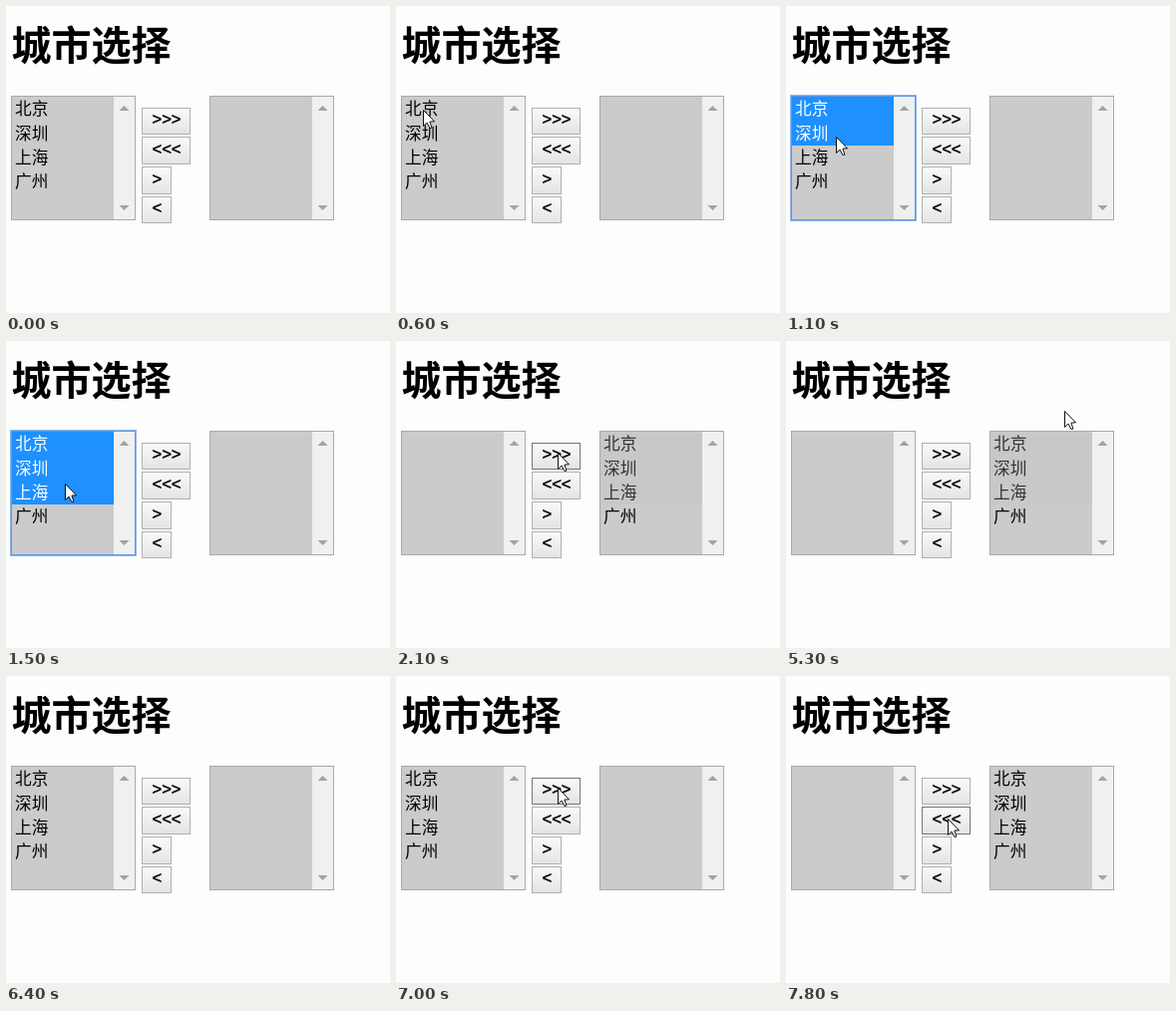
Animation, 385 px wide and 308 px high, one loop 8000 ms. Source, as an HTML page with a canvas:

```html
<!DOCTYPE html>
<html lang="zh-CN">
<head>
<meta charset="utf-8">
<title>城市选择</title>
<style>
html, body { margin: 0; width: 100%; height: 100%; overflow: hidden; background: #fdfdfd; }
canvas { display: block; width: 385px; height: 308px; }
</style>
</head>
<body>
<canvas id="stage" width="385" height="308"></canvas>
<script>
const ctx = document.getElementById('stage').getContext('2d');
const LOOP = 8000, STEP = 100;
const CJK = '"Noto Sans CJK SC", "Noto Sans CJK", "Noto Sans CJK JP", sans-serif';
const CITIES = ['北京', '深圳', '上海', '广州'];
const LABELS = ['>>>', '<<<', '>', '<'];
const LIST = { y: 90, size: 125, row: 24.3 };
const BUTTON = { x: 136, y: 102, pitch: 29.67, height: 27.7 };
const PRESS = 900, DROP = 1500, ADD = 2100, RETURN = 6400, ADD_AGAIN = 7300;

const linear = k => k;
const easeOut = k => 1 - (1 - k) ** 3;
const smooth = k => k * k * (3 - 2 * k);

// Each visit is a chain of glides; the pointer is hidden between visits.
const at = (x, y) => ({ x, y });
const glide = (from, to, target, ease) => ({ from, to, target, ease });
const VISITS = [
  { begin: 100, end: 5500, origin: at(281, 65), glides: [
    glide(100, 600, at(27, 104), easeOut),
    glide(PRESS, DROP, at(59, 143), easeOut),
    glide(DROP, 1900, at(162, 112), smooth),
    glide(2700, 3300, at(163, 151), smooth),
    glide(5100, 5400, at(337, 30), linear)
  ] },
  { begin: 6500, end: LOOP, origin: at(353, 32), glides: [
    glide(6500, 7000, at(162, 112), easeOut),
    glide(ADD_AGAIN, 7800, at(162, 143), smooth)
  ] }
];

function pointerAt(t) {
  const visit = VISITS.find(v => t >= v.begin && t < v.end);
  if (!visit) return null;
  let { x, y } = visit.origin;
  for (const { from, to, target, ease } of visit.glides) {
    const k = ease(Math.min(1, Math.max(0, (t - from) / (to - from))));
    x += (target.x - x) * k;
    y += (target.y - y) * k;
  }
  return at(Math.round(x), Math.round(y));
}

// Dragging selects every row down to the pointer.
function selectedRows(t) {
  if (t < PRESS || t >= RETURN) return 0;
  const { y } = pointerAt(Math.min(t, DROP));
  return Math.ceil((y - LIST.y) / LIST.row);
}

function text(str, x, y, font, color) {
  ctx.font = font;
  ctx.fillStyle = color;
  ctx.fillText(str, x, y);
}

function polygon(points) {
  ctx.beginPath();
  points.forEach(([x, y]) => ctx.lineTo(x, y));
  ctx.closePath();
}

function frame(x, y, w, h, color) {
  ctx.strokeStyle = color;
  ctx.lineWidth = 1;
  ctx.strokeRect(x + 0.5, y + 0.5, w - 1, h - 1);
}

function scrollArrow(x, y, dir) {
  polygon([[x - 5, y + 2.5 * dir], [x + 5, y + 2.5 * dir], [x, y - 2.5 * dir]]);
  ctx.fillStyle = '#a3a3a3';
  ctx.fill();
}

function drawList(x, filled, selected, focused) {
  const { y, size, row } = LIST;
  ctx.fillStyle = '#cbcbcb';
  ctx.fillRect(x, y, size, size);
  if (selected) {
    ctx.fillStyle = focused ? '#1e90ff' : '#c8c8c8';
    ctx.fillRect(x + 1, y + 1, 102, Math.round(selected * row));
  }
  if (filled) CITIES.forEach((city, i) => {
    const color = i >= selected ? '#000' : focused ? '#fff' : '#323232';
    text(city, x + 4, y + 19.3 + i * row, '16.67px ' + CJK, color);
  });
  ctx.fillStyle = '#f1f0f1';
  ctx.fillRect(x + 103, y + 1, 21, size - 2);
  scrollArrow(x + 113.5, y + 12.5, 1);
  scrollArrow(x + 113.5, y + 112.5, -1);
  frame(x, y, size, size, focused ? '#5b98e3' : '#a9a9a9');
  if (focused) frame(x - 1, y - 1, size + 2, size + 2, '#8ab6ec');
}

function drawButton(label, i, pointer) {
  const { x } = BUTTON;
  const top = BUTTON.y + i * BUTTON.pitch;
  const y = Math.floor(top), h = Math.floor(top + BUTTON.height) - y;
  const w = label.length > 1 ? 49 : 30;
  const hover = pointer && pointer.x >= x && pointer.x < x + w && pointer.y >= y && pointer.y < y + h;
  const shade = ctx.createLinearGradient(0, y, 0, y + h);
  shade.addColorStop(0, '#fafafa');
  shade.addColorStop(1, '#e3e3e3');
  ctx.fillStyle = shade;
  ctx.fillRect(x, y, w, h);
  frame(x, y, w, h, hover ? '#747474' : '#b0b0b0');
  const baseline = Math.round(top + 17.2);
  text(label, x + 10.4, baseline, '16.67px "Liberation Sans", sans-serif', '#000');
  ctx.strokeStyle = '#000';
  ctx.lineWidth = 0.4;
  ctx.strokeText(label, x + 10.4, baseline);
}

function drawPointer({ x, y }) {
  ctx.save();
  ctx.translate(x + 0.5, y + 0.5);
  polygon([[0, 0], [0, 16], [3.6, 12.6], [6.4, 18], [8.4, 17.6], [6.4, 11.6], [11, 11.3]]);
  ctx.fillStyle = '#fff';
  ctx.fill();
  ctx.strokeStyle = '#111';
  ctx.lineWidth = 1;
  ctx.stroke();
  ctx.restore();
}

function draw(t) {
  const pointer = pointerAt(t);
  const moved = (t >= ADD && t < RETURN) || t >= ADD_AGAIN;
  const selected = selectedRows(t);
  ctx.fillStyle = '#fdfdfd';
  ctx.fillRect(0, 0, 385, 308);
  text('城市选择', 5.6, 53.5, 'bold 40px ' + CJK, '#000');
  drawList(5, !moved, moved ? 0 : selected, !moved && selected > 0);
  drawList(204, moved, moved ? selected : 0, false);
  LABELS.forEach((label, i) => drawButton(label, i, pointer));
  if (pointer) drawPointer(pointer);
}

const start = performance.now();
function tick() {
  const t = (performance.now() - start) % LOOP;
  draw(Math.floor(t / STEP) * STEP);
  requestAnimationFrame(tick);
}
tick();
</script>
</body>
</html>
```
